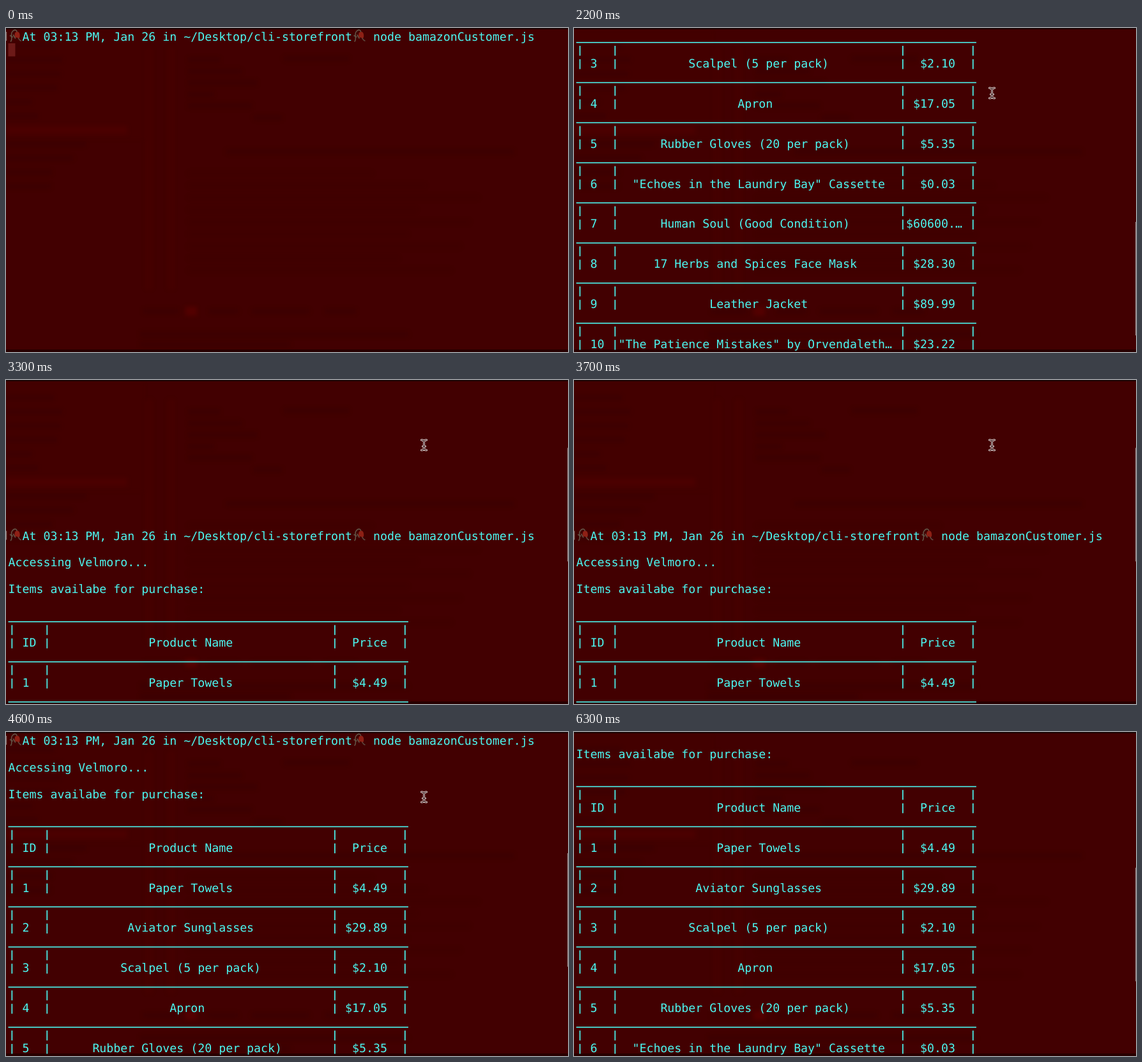
An HTML page with a canvas that plays this animation: 880x508 px, repeating every 6.4 s.

```html
<!DOCTYPE html>
<html lang="en">
<head>
<meta charset="utf-8">
<title>Storefront terminal</title>
<style>
  html, body { margin: 0; width: 100%; height: 100%; overflow: hidden; background: #420001; }
  canvas { display: block; }
</style>
</head>
<body>
<canvas id="stage" width="880" height="508"></canvas>
<script>
const LOOP = 6400, W = 880, H = 508;
const COL = 10.99, ROW = 20.96, LEFT = 3.5, BASE = 20, ROWS = 24;
const CYAN = '#4bf6f0';
const FONT = '18.25px "DejaVu Sans Mono", monospace';
const ctx = document.getElementById('stage').getContext('2d');

const products = [
  ['ID', 'Product Name', 'Price'],
  ['1', 'Paper Towels', '$4.49'],
  ['2', 'Aviator Sunglasses', '$29.89'],
  ['3', 'Scalpel (5 per pack)', '$2.10'],
  ['4', 'Apron', '$17.05'],
  ['5', 'Rubber Gloves (20 per pack)', '$5.35'],
  ['6', '"Echoes in the Laundry Bay" Cassette', '$0.03'],
  ['7', 'Human Soul (Good Condition)', '$60600.…'],
  ['8', '17 Herbs and Spices Face Mask', '$28.30'],
  ['9', 'Leather Jacket', '$89.99'],
  ['10', '"The Patience Mistakes" by Orvendaleth…', '$23.22']
];
const TABLE = 6, QUESTION = 41;

// [time, first visible line]
const scrollKeys = [[2100, 18], [2700, -2], [3100, -11], [3700, -11], [4300, -3], [4900, 3]];

const colX = col => LEFT + col * COL;
const clamp01 = v => Math.min(1, Math.max(0, v));

function rect(color, x, y, w, h) {
  ctx.fillStyle = color;
  ctx.fillRect(x, y, w, h);
}

function text(str, col, y, color = CYAN, weight = '') {
  ctx.font = weight + ' ' + FONT;
  ctx.fillStyle = color;
  ctx.fillText(str, colX(col), y);
}

function centered(str, col, width, y) {
  text(str, col + Math.floor((width - str.length) / 2), y);
}

function stroke(color, width, path) {
  ctx.strokeStyle = color;
  ctx.lineWidth = width;
  ctx.stroke(path);
}

// Faint blurred window showing through the terminal
function makeBackdrop() {
  const layer = document.createElement('canvas');
  layer.width = W;
  layer.height = H;
  const g = layer.getContext('2d');
  g.fillStyle = '#420001';
  g.fillRect(0, 0, W, H);
  g.filter = 'blur(3px)';
  const bar = (color, x, y, w, h = 8) => {
    g.fillStyle = color;
    g.fillRect(x, y - h / 2, w, h);
  };
  const dark = 'rgba(28,4,12,.15)', red = 'rgba(110,0,0,.18)';
  bar('rgba(80,0,0,.1)', 0, 90, 216, 170);
  bar(red, 0, 160, 190, 14);
  [75, 88, 85, 80, 40, 50, 0, 125, 105, 72, 70].forEach((w, i) => bar(dark, 0, 28 + i * 22, w));
  [218, 252].forEach(x => bar('rgba(95,0,0,.1)', x, 220, 12, 380));
  [[285, 50, 50], [435, 48, 102], [285, 68, 84], [285, 86, 108], [285, 104, 40],
   [285, 122, 100], [388, 141, 44], [345, 194, 450], [210, 480, 420], [210, 496, 235],
   [215, 444, 55], [318, 444, 46], [385, 444, 90], [500, 444, 48]].forEach(b => bar(dark, ...b));
  for (let i = 0; i < 9; i++) bar('rgba(28,4,12,.06)', 285, 228 + i * 19, 290 + (i * 83) % 180);
  bar('rgba(130,0,0,.28)', 281, 444, 18, 14);
  g.filter = 'none';
  bar('#1c0505', 0, 1, W, 2);
  bar('#270000', 0, 506, W, 4);
  return layer;
}
const backdrop = makeBackdrop();

const stem = new Path2D('M4 19C8 14 2 8 7 3C11 -1 15 2 13 7M7 12L3 10M8 9L11 14');
const petals = new Path2D('M11 5Q17 2 18 8Q19 13 16 15Q14 12 11 13Q9 9 11 5Z');
const leaf = new Path2D('M16 14Q18 18 20 18');

function wiltedRose(x, y) {
  ctx.save();
  ctx.translate(x, y);
  stroke('#625446', 1.6, stem);
  ctx.fillStyle = '#8e2015';
  ctx.fill(petals);
  stroke('#5d4b40', 1.5, leaf);
  ctx.restore();
}

function shellLine(y) {
  rect('#8d7470', 0, y - 14, 1.2, 14);
  wiltedRose(colX(0), y - 18);
  text('At 03:13 PM, Jan 26 in ~/Desktop/cli-storefront', 2, y);
  wiltedRose(colX(49), y - 18);
  text('node bamazonCustomer.js', 52, y);
}

const rule = y => rect(CYAN, LEFT, y + 1.9, 57 * COL, 1.6);

function bars(y) {
  for (const col of [0, 5, 46, 56]) rect(CYAN, colX(col) + 5, y - 13, 1.7, 15.5);
}

function tableLine(n, y) {
  if (n % 3 === 0) return rule(y);
  bars(y);
  if (n % 3 === 1) return;
  const [id, name, price] = products[(n - 2) / 3];
  centered(id, 1, 4, y);
  centered(name, 6, 40, y);
  centered(price, 47, 9, y);
}

const block = (col, y) => rect('#6c1a18', colX(col), y - 17, COL, 20.5);

function drawLine(n, y, t) {
  const loaded = t >= 500;
  if (n === 0) shellLine(y);
  if (n === 1 && t < 200) block(0, y);
  if (n === 2 && t >= 200) text('Accessing Velmoro...', 0, y);
  if (n === 3 && t >= 200 && !loaded) block(0, y);
  if (!loaded) return;
  if (n === 4) text('Items availabe for purchase:', 0, y);
  if (n >= TABLE && n <= TABLE + products.length * 3) tableLine(n - TABLE, y);
  if (n === QUESTION) {
    text('?', 0, y, '#3b9d35');
    text('Enter a product ID:', 2, y, '#f5a31c', 'bold');
    block(23, y);
  }
}

function topLine(t) {
  if (t < 500) return 0;
  let [t0, v0] = scrollKeys[0];
  for (const [t1, v1] of scrollKeys) {
    if (t < t1) return Math.round(v0 + (v1 - v0) * clamp01((t - t0) / (t1 - t0)));
    [t0, v0] = [t1, v1];
  }
  return v0;
}

const beam = new Path2D('M-4 -8Q0 -8 0 -5Q0 -8 4 -8M0 -5V5M-4 8Q0 8 0 5Q0 8 4 8M-2 2H2');

function pointer(t) {
  if (t < 1600 || t >= 5400) return;
  const left = (1 - clamp01((t - 1600) / 500)) ** 2;
  ctx.save();
  ctx.translate(654.5 + 74 * left, 102 + 228 * left);
  stroke('#e8dede', 3, beam);
  stroke('#2a0606', 1.1, beam);
  ctx.restore();
}

function draw(t) {
  ctx.drawImage(backdrop, 0, 0);
  const top = topLine(t);
  for (let row = 0; row < ROWS; row++) drawLine(top + row, BASE + row * ROW, t);
  if (t >= 2200) rect('#978686', 879, 190 + 7.6 * top, 1, 178);
  pointer(t);
}

ctx.textRendering = 'geometricPrecision';
ctx.lineCap = 'round';
const start = performance.now();
function tick() {
  const t = (performance.now() - start) % LOOP;
  draw(Math.floor(t / 100) * 100);
  requestAnimationFrame(tick);
}
tick();
</script>
</body>
</html>
```
